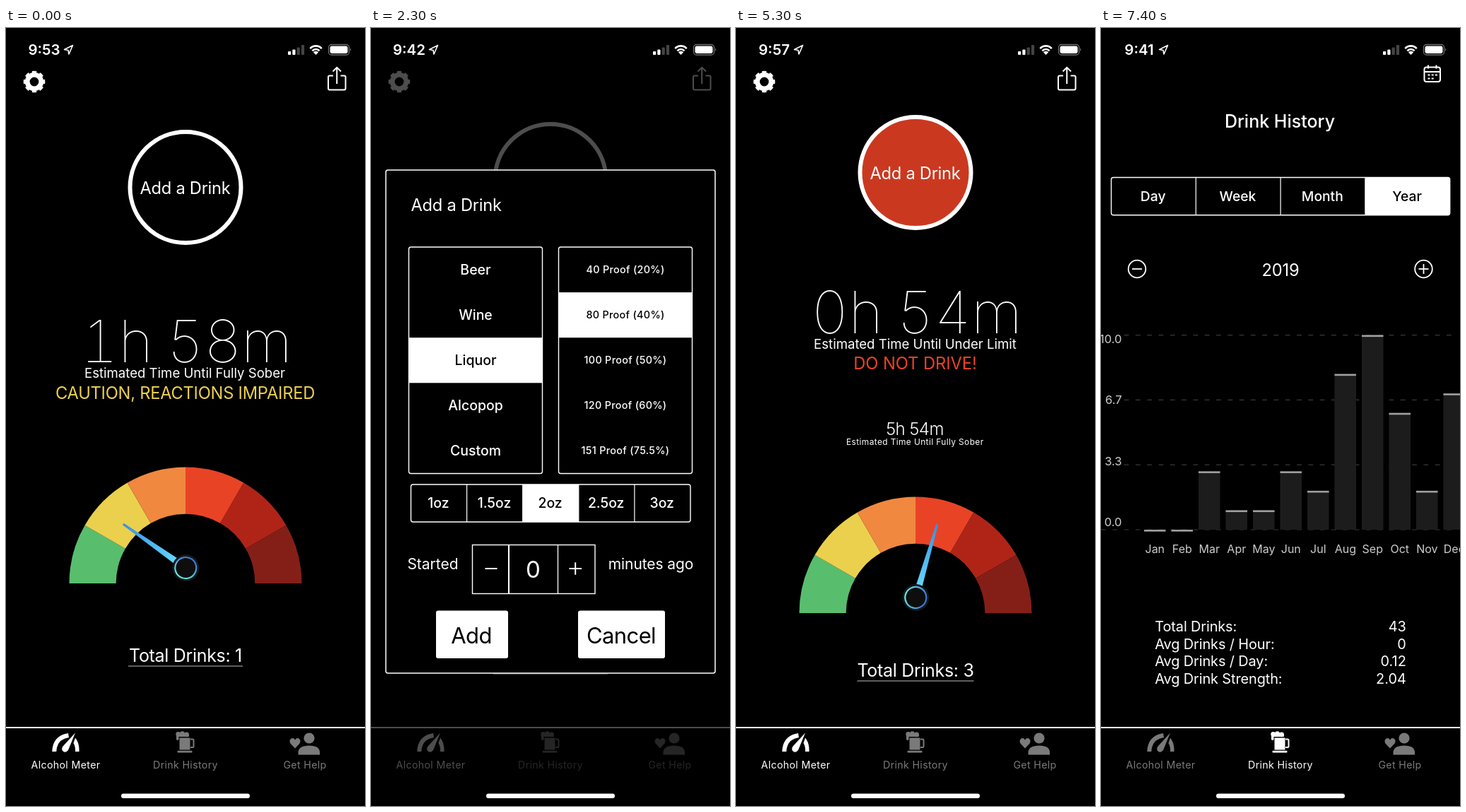
Recreate the animation shown at these times as an HTML page. Size 508x1101 px, loop 8000 ms.

```html
<!DOCTYPE html>
<html lang="en">
<head>
<meta charset="utf-8">
<title>Drink meter</title>
<style>
  html, body { margin: 0; width: 100%; height: 100%; overflow: hidden; background: #000; }
  svg { display: block; width: 100vw; height: 100vh; font-family: Inter, Roboto, sans-serif; }
  text { white-space: pre; }
  .timer { font-variant-numeric: tabular-nums; }
</style>
</head>
<body>
<svg id="stage" viewBox="0 0 508 1101">
  <defs>
    <linearGradient id="hub"><stop stop-color="#62ecdf"/><stop offset="1" stop-color="#3a76d6"/></linearGradient>
    <linearGradient id="needle" x1="0" y1="0" x2="0" y2="1">
      <stop stop-color="#3b8ee2"/><stop offset="1" stop-color="#62d8fb"/>
    </linearGradient>
  </defs>
</svg>
<script>
const LOOP = 8000;
const MONTHS = 'Jan Feb Mar Apr May Jun Jul Aug Sep Oct Nov Dec'.split(' ');
const DRINKS = [0, 0, 3, 1, 1, 3, 2, 8, 10, 6, 2, 7];

// Drawing helpers, each returning SVG markup
const text = (x, y, size, str, { fill = '#fff', anchor = 'middle', weight = 400, gap = 0 } = {}) =>
  `<text x="${x}" y="${y}" font-size="${size}" fill="${fill}" text-anchor="${anchor}" font-weight="${weight}" letter-spacing="${gap}">${str}</text>`;
const rect = (x, y, w, h, r = 0, fill = '#fff', extra = '') =>
  `<rect x="${x}" y="${y}" width="${w}" height="${h}" rx="${r}" fill="${fill}" ${extra}/>`;
const frame = (x, y, w, h, r = 3, width = 1.4) =>
  rect(x, y, w, h, r, 'none', `stroke="#fff" stroke-width="${width}"`);
const path = (d, fill = '#fff') => `<path d="${d}" fill="${fill}"/>`;
const line = (d, width = 2, color = '#fff', extra = '') =>
  `<path d="${d}" fill="none" stroke="${color}" stroke-width="${width}" ${extra}/>`;
const circle = (x, y, r, fill = '#fff', stroke = 'none', width = 0, extra = '') =>
  `<circle cx="${x}" cy="${y}" r="${r}" fill="${fill}" stroke="${stroke}" stroke-width="${width}" ${extra}/>`;
const group = (attrs, ...parts) => `<g ${attrs}>${parts.join('')}</g>`;

function statusBar(time) {
  const bars = [5, 7.5, 10.5, 14].map((h, i) =>
    rect(399 + i * 6.3, 38 - h, 4.2, h, 1, i < 2 ? '#fff' : '#444')).join('');
  const wifi = [[6.5, 5], [11, 8.2]].map(([r, w]) =>
    line(`M${438.5 - w} ${37 - r * .72}A${r} ${r} 0 0 1 ${438.5 + w} ${37 - r * .72}`, 2.6)).join('');
  return text(54, 38, 20.5, time, { weight: 600 }) +
    line('M94.5 24.5L82.5 30.5L88 31.5L89 37Z', 1.6, '#fff', 'stroke-linejoin="round"') +
    bars + wifi + path('M438.5 38L434.8 34.2Q438.5 31.4 442.2 34.2Z') +
    rect(456.5, 23.5, 29, 14.5, 4, 'none', 'stroke="#707070" stroke-width="1.3"') +
    rect(458.5, 25.5, 25, 10.5, 2.4) + path('M487 28.3Q489.6 30.7 487 33.1Z', '#707070');
}

const gearAndShare = () =>
  circle(40, 76, 9.8, 'none', '#fff', 6.8) +
  circle(40, 76, 13.6, 'none', '#fff', 3.4,
    'pathLength="16" stroke-dasharray="1.15 .85" stroke-dashoffset=".575"') +
  line('M463 67.5H458Q456 67.5 456 69.5V85.5Q456 87.5 458 87.5H478.5Q480.5 87.5 480.5 85.5V69.5Q480.5 67.5 478.5 67.5H473.5M468.2 79V56M462.5 61.5L468.2 55.8L474 61.5');

function tabBar(active) {
  const icons = [
    c => line('M68.3 1024Q69 1004 88.5 1001', 6, c) +
      path('M98 997.5L88 1022Q84 1027 80 1023Q78 1019 81 1016Z', c) +
      path('M98 1004.5Q104 1012 103.5 1024H98Q98.5 1017 95.5 1012Z', c),
    c => [[243.7, 999.5], [249.5, 998.7], [255.5, 999.8]].map(([x, y]) => circle(x, y, 3.4, c)).join('') +
      rect(241, 999, 3.5, 9, 1.7, c) + rect(242, 999, 17, 4, 1, c) +
      rect(245.5, 1004.5, 15, 17, 0, c) + rect(242.5, 1022.8, 21, 2.8, 1, c) +
      line('M261 1006.5H264Q265.5 1006.5 265.5 1008V1016.5Q265.5 1018 264 1018H261', 2, c),
    c => path('M409 1019.5L402.5 1012.5Q400 1008 403.5 1005.5Q407 1004 409 1007.5Q411 1004 414.5 1005.5Q418 1008 415.5 1012.5Z', c) +
      circle(429, 1005, 7.6, c) + path('M413.5 1028.5V1024Q415 1015.5 429 1015.5Q443 1015.5 444 1024V1028.5Z', c)
  ];
  return line('M0 990H508') + ['Alcohol Meter', 'Drink History', 'Get Help'].map((label, i) => {
    const color = i === active ? '#fff' : '#7a7a7a';
    return icons[i](color) + text([84.5, 254, 423][i], 1048, 14.2, label, { fill: color, gap: .35 });
  }).join('');
}

const homeBar = () => rect(163, 1083.5, 182, 6.5, 3.25);

function gauge(y, angle) {
  const outer = 164.5, inner = 98.3;
  const point = (r, deg) => {
    const a = deg * Math.PI / 180;
    return `${254 - r * Math.cos(a)} ${y - r * Math.sin(a)}`;
  };
  const colors = ['#59bd6e', '#ebd04d', '#f08840', '#e94326', '#b02418', '#841f18'];
  const sectors = colors.map((c, i) => {
    const from = i * 30, to = from + 30;
    return path(`M${point(outer, from)}A${outer} ${outer} 0 0 1 ${point(outer, to)}L${point(inner, to)}A${inner} ${inner} 0 0 0 ${point(inner, from)}Z`, c);
  }).join('');
  return sectors + group(`transform="translate(254.3 ${y - 22}) rotate(${angle})"`,
    path('M-1.5 -108H1.5L4.5 -16H-4.5Z', 'url(#needle)'),
    circle(0, 0, 19, '#15181b'), circle(0, 0, 15, '#0e0e0f', 'url(#hub)', 2.2));
}

const addButton = (y, fill) =>
  circle(254, y, 78.5, fill, '#fff', 6) + text(253.5, y + 9, 23.7, 'Add a Drink', { gap: -.25 });

const bigTime = (y, hours, minutes) => group('class="timer"',
  text(208, y, 83, hours, { anchor: 'end', weight: 100 }),
  text(227, y, 83, minutes, { anchor: 'start', weight: 100, gap: -.5 }));

const total = (y, count, half) =>
  text(254, y, 25, 'Total Drinks: ' + count, { gap: -.3 }) +
  line(`M${254 - half} ${y + 6.5}H${254 + half}`, 1.2, '#bbb');

const meter = (time, ...parts) =>
  statusBar(time) + gearAndShare() + parts.join('') + tabBar(0) + homeBar();

const calm = () => meter('9:53',
  addButton(225.5, 'none'), bigTime(473, '1h', '58m'),
  text(253, 495, 18.6, 'Estimated Time Until Fully Sober'),
  text(253.5, 524.5, 23.7, 'CAUTION, REACTIONS IMPAIRED', { fill: '#ebd04d', gap: -.24 }),
  gauge(786, -55), total(896.5, 1, 81));

const warning = () => meter('9:57',
  addButton(204.5, '#cb3820'), bigTime(432, '0h', '54m'),
  text(253.5, 453.5, 18.6, 'Estimated Time Until Under Limit'),
  text(253.5, 482.5, 23.7, 'DO NOT DRIVE!', { fill: '#e94326', gap: -.05 }),
  text(253, 575.5, 24, '5h 54m', { weight: 300, gap: -.5 }),
  text(253.3, 590.3, 11.9, 'Estimated Time Until Fully Sober', { gap: .4 }),
  gauge(828, 16.3), total(917.5, 3, 82.5));

function picker(x, labels, chosen, size, gap) {
  return rect(x, 310 + chosen * 64.1, 189, 64.1) + frame(x, 310, 189, 320.5) +
    labels.map((label, i) => text(x + 94.5, 342 + i * 64 + size * .36, size, label,
      { fill: i === chosen ? '#000' : '#fff', weight: 500, gap })).join('');
}

function segments(x, y, step, h, labels, chosen, size) {
  return rect(x + chosen * step, y, step, h, chosen === labels.length - 1 ? 3 : 0) +
    frame(x, y, step * labels.length, h) +
    labels.map((label, i) =>
      (i ? line(`M${x + i * step} ${y}v${h}`, 1.2) : '') +
      text(x + (i + .5) * step - .7, y + h / 2 + size * .36, size, label,
        { fill: i === chosen ? '#000' : '#fff', weight: 500 })).join('');
}

const dialog = () => statusBar('9:42') +
  group('opacity=".3"', gearAndShare(), circle(254, 214.5, 78.5, 'none', '#fff', 6),
    line('M173 914H335', 1.4), tabBar(0)) +
  rect(21, 201, 466, 712, 3, '#000', 'stroke="#fff" stroke-width="1.5"') +
  text(56.5, 259, 23.7, 'Add a Drink', { anchor: 'start', gap: -.25 }) +
  picker(53.5, ['Beer', 'Wine', 'Liquor', 'Alcopop', 'Custom'], 2, 19.5, 0) +
  picker(265.5, ['40 Proof (20%)', '80 Proof (40%)', '100 Proof (50%)', '120 Proof (60%)', '151 Proof (75.5%)'], 1, 14.4, .3) +
  segments(56.5, 646, 79.1, 53, ['1oz', '1.5oz', '2oz', '2.5oz', '3oz'], 2, 19.4) +
  text(87.5, 765.5, 21, 'Started') + text(396, 765.5, 21, 'minutes ago', { gap: -.1 }) +
  frame(143.5, 731.5, 173.5, 69, 0) + line('M195 731V800', 2) + line('M264.5 731V800', 1.3) +
  line('M161.5 765H178.5M280.5 765H298M289.2 756.3V773.7') +
  text(229.5, 778, 33, '0') +
  rect(92, 824.5, 102, 67.5, 3) + rect(293, 824.5, 123, 67.5, 3) +
  text(142, 870.5, 31, 'Add', { fill: '#000', gap: -.6 }) +
  text(354, 870.5, 31, 'Cancel', { fill: '#000', gap: -.6 }) + homeBar();

function chart() {
  const base = 710, unit = 27.55, step = 38.5;
  const grid = ['0.0', '3.3', '6.7', '10.0'].map((label, i) =>
    line(`M0 ${base - i * 91.8}H498`, 1.2, '#383838', 'stroke-dasharray="6.8 9.5"') +
    rect(0, 692 - i * 86.4, 31, 15, 0, '#000') +
    text(29.5, 705 - i * 86.4, 16.5, label, { fill: '#ccc', anchor: 'end' }));
  const bars = DRINKS.map((n, i) => {
    const x = 61 + i * step, top = base - n * unit;
    return rect(x, top, 30.5, n * unit, 0, '#1c1c1c') + rect(x, top, 30.5, 2.6, 0, '#a0a0a0') +
      text(x + 15.3, 742.5, 16, MONTHS[i], { fill: '#ccc' });
  });
  return grid.concat(bars).join('');
}

const history = () => statusBar('9:41') +
  frame(457.5, 55.5, 22.5, 20.5, 3, 2) +
  line('M457.5 62H480M463 52.5V57.5M474.5 52.5V57.5') +
  line('M462.5 66.5H476M462.5 71.5H472', 2, '#fff', 'stroke-dasharray="3 2.2"') +
  text(253, 141, 25, 'Drink History', { weight: 500 }) +
  segments(14.5, 211.5, 119.8, 53.2, ['Day', 'Week', 'Month', 'Year'], 3, 19.3) +
  [51, 456.5].map(x => circle(x, 341, 12.3, 'none', '#fff', 1.8) + line(`M${x - 7} 341h14`, 1.8)).join('') +
  line('M456.5 334v14', 1.8) + text(254, 351, 23.7, '2019', { gap: -.2 }) + chart() +
  [['Total Drinks:', '43'], ['Avg Drinks / Hour:', '0'], ['Avg Drinks / Day:', '0.12'], ['Avg Drink Strength:', '2.04']]
    .map(([label, value], i) => text(76.3, 854 + i * 24.5, 19.9, label, { anchor: 'start', gap: -.1 }) +
      text(431.8, 854 + i * 24.5, 19.9, value, { anchor: 'end' })).join('') +
  tabBar(1) + homeBar();

const scenes = [[0, calm], [500, dialog], [3500, warning], [6500, history]];
const stage = document.getElementById('stage');
stage.insertAdjacentHTML('beforeend', scenes.map(([, draw]) => group('class="scene"', draw())).join(''));
const layers = [...stage.querySelectorAll('.scene')];

function tick() {
  const now = performance.now() % LOOP;
  const current = scenes.filter(([start]) => start <= now).length - 1;
  layers.forEach((layer, i) => { layer.style.display = i === current ? '' : 'none'; });
  requestAnimationFrame(tick);
}
tick();
</script>
</body>
</html>
```
